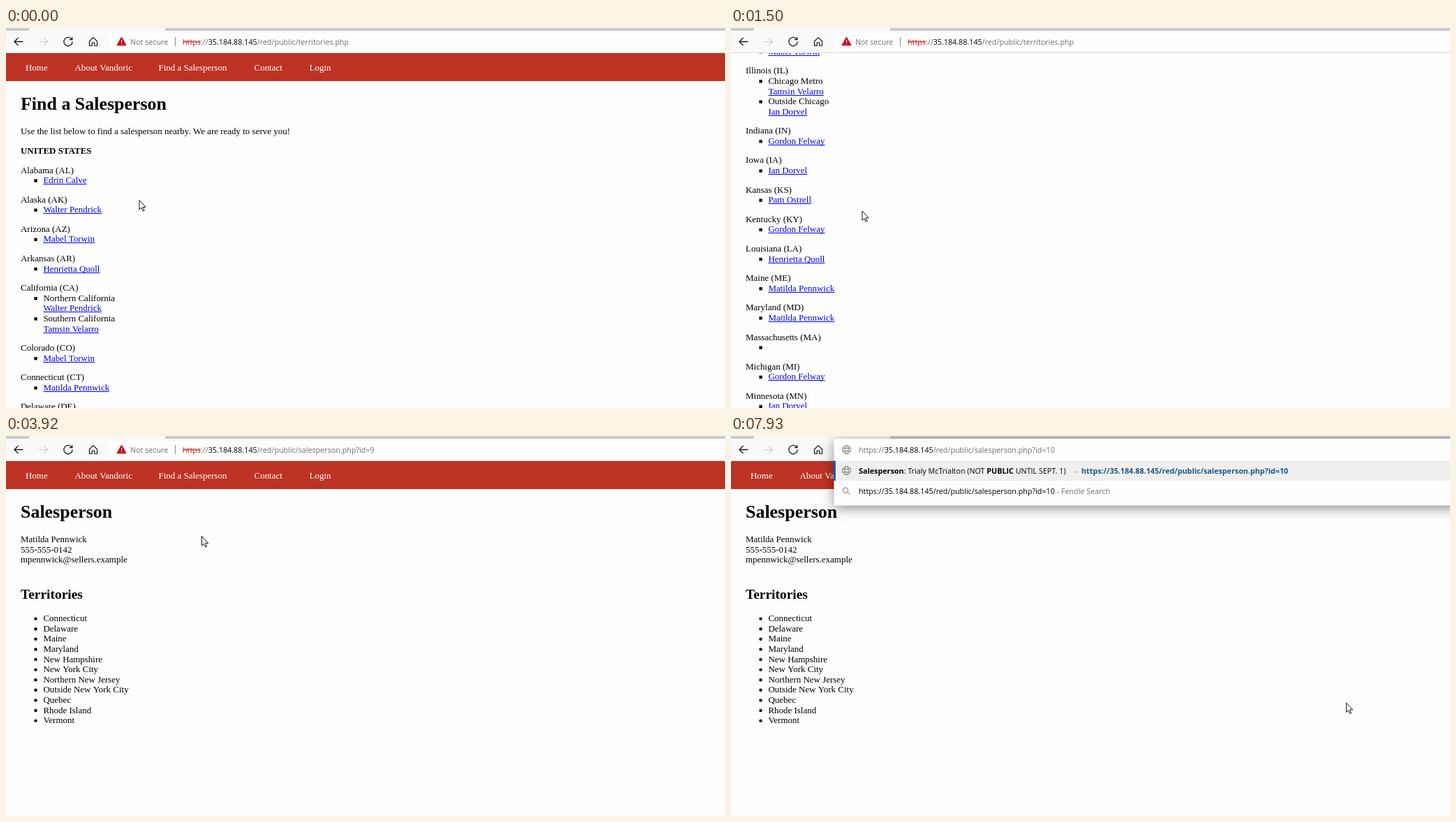
Write an HTML page with a canvas that moves like this. It is 1030 px wide and 544 px high and loops after 8000 ms.

```html
<!DOCTYPE html>
<html lang="en">
<head>
<meta charset="utf-8">
<title>Find a Salesperson</title>
<style>
  html, body { margin: 0; width: 100%; height: 100%; overflow: hidden; background: #fefefe; }
  canvas { display: block; }
</style>
</head>
<body>
<canvas id="stage" width="1030" height="544"></canvas>
<script>
const ctx = document.getElementById('stage').getContext('2d');
const W = 1030, H = 544, LOOP = 8000;
const ZOOM = 0.811, LINE = 18 * ZOOM, GAP = 16 * ZOOM;
const PAPER = '#fefefe', INK = '#000', GREY = '#6f6f6f', LINK = '#0000ee', RED = '#bc3324', URL_BLUE = '#16578c', SELECT = '#0078d7';

const serif = (px, bold) => `${bold ? 'bold ' : ''}${px}px "Liberation Serif", "Times New Roman", serif`;
const sans = bold => `${bold ? 'bold ' : ''}10.75px "Open Sans", "Noto Sans", sans-serif`;
const BODY = serif(16 * ZOOM), H1 = serif(32 * ZOOM, true), H2 = serif(24 * ZOOM, true);

const NAV = [['Home', 28], ['About Vandoric', 98.5], ['Find a Salesperson', 218.5], ['Contact', 355.5], ['Login', 434.5]];

const STATES = `Alabama (AL)|Edrin Calve
Alaska (AK)|Walter Pendrick
Arizona (AZ)|Mabel Torwin
Arkansas (AR)|Henrietta Quoll
California (CA)|Northern California:Walter Pendrick|Southern California:Tamsin Velarro
Colorado (CO)|Mabel Torwin
Connecticut (CT)|Matilda Pennwick
Delaware (DE)|Matilda Pennwick
Florida (FL)|Edrin Calve
Georgia (GA)|Edrin Calve
Hawaii (HI)|Mabel Torwin
Idaho (ID)|Mabel Torwin
Illinois (IL)|Chicago Metro:Tamsin Velarro|Outside Chicago:Ian Dorvel
Indiana (IN)|Gordon Felway
Iowa (IA)|Ian Dorvel
Kansas (KS)|Pam Ostrell
Kentucky (KY)|Gordon Felway
Louisiana (LA)|Henrietta Quoll
Maine (ME)|Matilda Pennwick
Maryland (MD)|Matilda Pennwick
Massachusetts (MA)|
Michigan (MI)|Gordon Felway
Minnesota (MN)|Ian Dorvel
Mississippi (MS)|Edrin Calve
Missouri (MO)|St. Louis Area:Edrin Calve|Kansas City Area:Ian Dorvel
Montana (MT)|Mabel Torwin
Nebraska (NE)|Ian Dorvel`.split('\n').map(row => row.split('|'));

const TERRITORIES = ['Connecticut', 'Delaware', 'Maine', 'Maryland', 'New Hampshire', 'New York City',
  'Northern New Jersey', 'Outside New York City', 'Quebec', 'Rhode Island', 'Vermont'];

// [time, scroll offset]
const SCROLL = [[0, 0], [150, 18], [270, 62], [390, 115], [510, 168], [660, 222.3], [810, 305], [930, 390], [1050, 475],
  [1200, 554.7], [1350, 630], [1500, 692], [1650, 748], [1800, 800], [1920, 848], [2040, 889.8]];

// [time, x, y, shape]; shape stays until it is changed
const POINTER = [[0, 190.5, 246, 'arrow'], [660, 187.5, 260], [1200, 187.5, 261.5], [1650, 174, 252], [1800, 148, 240], [1920, 128, 230],
  [2040, 114, 221], [2190, 116, 221, 'hand'], [2760, 115, 221, 'arrow'], [2880, 138, 213], [3030, 233, 191],
  [3180, 332, 262], [3303, 300, 312], [3427, 220, 300], [3550, 142, 256], [3673, 176, 206], [3797, 240, 166],
  [3920, 280, 143], [4070, 340, 104], [4190, 430, 58], [4310, 520, 28, 'beam'], [4440, 560, 25], [4840, 548, 23],
  [4960, 535, 21], [5110, 530, 17], [5230, 526, 26], [5380, 523, 24, 'arrow'], [5510, 523, 25],
  [7780, 634, 173.5], [7930, 881, 381.5]];
let shape;
for (const key of POINTER) shape = key[3] = key[3] || shape;

const CURSORS = {
  arrow: new Path2D('M.5 .5V14L3.5 11.2 5.6 16 7.6 15.1 5.5 10.4H9.6Z'),
  hand: new Path2D('M-1.5 1q1.5-2 3 0v6q2-1 3 .6q2.2-.8 2.8.8q2-.4 2 1.5v3.5q0 3-2 5h-7q-3-4-5.5-7.5q.5-2 3.7.8Z'),
  beam: new Path2D('M-3-7H-1L0-6 1-7H3M-3 7H-1L0 6 1 7H3M0-6V6')
};

const held = (keys, t) => keys.findLast(key => key[0] <= t);

function box(x, y, w, h, color) {
  ctx.fillStyle = color;
  ctx.fillRect(x, y, w, h);
}

function text(str, x, y, color = INK, font = BODY) {
  ctx.font = font;
  ctx.fillStyle = color;
  ctx.fillText(str, x, y);
  return x + ctx.measureText(str).width;
}

function stroke(path, x, y, color, width = 1.1) {
  ctx.save();
  ctx.translate(x, y);
  ctx.strokeStyle = color;
  ctx.lineWidth = width;
  ctx.stroke(new Path2D(path));
  ctx.restore();
}

// Runs of [text, colour, bold, fixed x] set one after another.
function runs(list, x, y) {
  for (const [str, color, bold, at] of list) x = text(str, at || x, y, color, sans(bold));
  return x;
}

function link(str, x, y) {
  const end = text(str, x, y, LINK);
  if (str) box(x, Math.round(y + 1), end - x, 1, LINK);
}

function navItems() {
  for (const [label, x] of NAV) text(label, x, 61, '#fff');
}

function pageTop(title) {
  box(0, 36, W, 40, RED);
  navItems();
  text(title, 21, 117, INK, H1);
}

function territoryPage(scroll) {
  ctx.translate(0, -scroll);
  pageTop('Find a Salesperson');
  text('Use the list below to find a salesperson nearby. We are ready to serve you!', 21, 152.3);
  text('UNITED STATES', 21, 179.9, INK, serif(16 * ZOOM, true));
  let y = 207.5;
  for (const [state, ...items] of STATES) {
    text(state, 21, y);
    for (const item of items) {
      y += LINE;
      box(40.4, y - 5.7, 4.3, 4.3, INK);
      const [area, person] = item.split(':');
      if (person) {
        text(area, 53.4, y);
        y += LINE;
      }
      link(person || area, 53.4, y);
    }
    y += LINE + GAP;
  }
}

function personPage() {
  pageTop('Salesperson');
  ['Matilda Pennwick', '555-555-0142', 'mpennwick@sellers.example'].forEach((str, i) => text(str, 21, 152.3 + i * LINE));
  text('Territories', 21, 232.8, INK, H2);
  TERRITORIES.forEach((name, i) => {
    const y = 265.2 + i * LINE;
    text(name, 53.4, y);
    ctx.beginPath();
    ctx.arc(42.5, y - 3.6, 2.2, 0, 7);
    ctx.fill();
  });
}

function globe(y) {
  stroke('M-6 0A6 6 0 1 1 6 0A6 6 0 1 1-6 0M-2.6 0A2.6 6 0 1 1 2.6 0A2.6 6 0 1 1-2.6 0M-5.5-2.2H5.5M-5.5 2.2H5.5', 165.5, y, '#707070', 0.9);
}

function toolbar() {
  box(0, 0, W, 36, '#f9f9f9');
  box(0, 0, 33, 4, '#cbcbcb');
  box(228, 0, W, 4, '#cbcbcb');
  box(0, 35, W, 1, '#d9d9d9');
  stroke('M6.5 0H-6M-.5-5.5-6 0-.5 5.5', 18, 19.5, '#1a1a1a', 1.3);
  stroke('M-6.5 0H6M.5-5.5 6 0 .5 5.5', 53.5, 19.5, '#cccccc', 1.2);
  stroke('M5.3-3.2A6.2 6.2 0 1 0 6.2 0M5.8-6.5V-2.8H2', 89, 19.5, '#1a1a1a', 1.3);
  stroke('M-5.5-.5 0-6 5.5-.5V6H1.8V1.5H-1.8V6H-5.5Z', 125, 19.5, '#1a1a1a', 1.2);
}

function pill(color, ring) {
  ctx.beginPath();
  ctx.roundRect(148, 7, W, 25, 4);
  ctx.fillStyle = color;
  ctx.fill();
  if (ring) {
    ctx.strokeStyle = '#2f7cd0';
    ctx.lineWidth = 1.5;
    ctx.stroke();
  }
}

const HOST = '35.184.88.145', PERSON = '/red/public/salesperson.php?id=';
const fullUrl = id => 'https://' + HOST + PERSON + id;

function restingAddress(path) {
  ctx.fillStyle = '#d0021b';
  ctx.fill(new Path2D('M165.3 13.2Q165.8 12.8 166.3 13.6L172.2 24.2Q172.4 25.2 171.4 25.2H159.4Q158.4 25.2 158.8 24.2L164.6 13.6Z'));
  box(164.9, 16.8, 1.2, 4, '#fff');
  box(164.9, 22, 1.2, 1.3, '#fff');
  text('Not secure', 178, 23.5, GREY, sans());
  box(242, 13, 1, 13, '#8a8a8a');
  const end = text('https', 253, 23.5, '#c5221f', sans());
  box(253, 19.5, end - 253, 1, '#c5221f');
  runs([['://', GREY], [HOST, INK], [path, GREY]], end, 23.5);
}

function editedAddress(id, selected) {
  globe(19.5);
  const x = runs([['https://', GREY], [HOST, INK], [PERSON + id, GREY]], 183, 23.5);
  if (selected) {
    ctx.font = sans();
    box(x, 11, ctx.measureText(selected).width, 17, SELECT);
    text(selected, x, 23.5, '#fff', sans());
  }
  return x;
}

const bold = str => [str, INK, true];
const plain = str => [str, INK];
const target = (x, match, rest = '') => [['-', GREY, false, x - 8.3], [fullUrl(match), URL_BLUE, true, x], [rest, URL_BLUE]];
const search = id => [plain(fullUrl(id)), [' - Fendle Search', GREY]];
const HEAD = [bold('Salesperson'), plain(': ')];

const SHORT_LIST = [
  [...HEAD, plain('Trialy McTrialton (NOT '), bold('PUBLIC'), plain(' UNTIL SEPT. 1)'), ...target(502, '10')],
  search('10')
];
const LONG_LIST = [
  [...HEAD, plain('Dozy Dozeman (FIRED FOR STEALING)'), ...target(448, '1', '1')],
  search('1'),
  [...HEAD, plain('Trialy McTrialton (NOT '), bold('PUBLIC'), plain(' UNTIL SEPT. '), bold('1'), plain(')'), ...target(502, '1', '0')],
  [plain('Find a '), bold('Salesperson'), ...target(292, '1', '2')]
];

function dropdown(rows, opening) {
  const bottom = rows.length * 29.25 + 41;
  ctx.save();
  if (opening) box(143, 36, W, bottom + 14 - 36, 'rgba(0,0,0,.1)');
  ctx.shadowColor = 'rgba(0,0,0,.45)';
  ctx.shadowBlur = opening ? 4 : 18;
  ctx.shadowOffsetY = opening ? 1 : 4;
  ctx.beginPath();
  ctx.roundRect(147.5, 4, W, bottom - 4, 3);
  ctx.fillStyle = PAPER;
  ctx.fill();
  ctx.restore();
  box(148, 35.5, W, 28.5, '#f0efee');
  box(147, 35.5, 3, 28.5, '#1a5dbe');
  if (opening) {
    ctx.save();
    ctx.beginPath();
    ctx.rect(150, 36, W, 40);
    ctx.clip();
    navItems();
    ctx.restore();
  }
  rows.forEach((row, i) => {
    const y = 49.5 + i * 29.25;
    if (i === 1) stroke('M2.3 0A3.8 3.8 0 1 1-5.3 0A3.8 3.8 0 1 1 2.3 0M1.3 2.7 5.5 6.5', 165.5, y - 1, '#777', 1);
    else globe(y);
    runs(row, 183, y + 4);
  });
}

function addressBar(t) {
  if (t >= 6930) {
    dropdown(SHORT_LIST);
    editedAddress('10');
    if (t < 7500) box(464, 11, 1, 16, INK);
  } else if (t >= 6440) {
    dropdown(LONG_LIST, t < 6560);
    editedAddress('1', '1');
  } else if (t >= 4690) {
    pill(PAPER, true);
    editedAddress('', '9');
  } else {
    pill(t >= 4310 ? '#f3f3f3' : PAPER);
    restingAddress(t < 2620 ? '/red/public/territories.php' : PERSON + '9');
  }
}

function pointer(t) {
  const [, x, y, kind] = held(POINTER, t);
  ctx.save();
  ctx.translate(x, y);
  ctx.lineWidth = 1;
  ctx.strokeStyle = '#111';
  ctx.fillStyle = '#fff';
  if (kind !== 'beam') ctx.fill(CURSORS[kind]);
  ctx.stroke(CURSORS[kind]);
  if (kind === 'hand') stroke('M1.5 7V10M4.5 7.6V10.5M7.3 8.4V10.8', 0, 0, '#111', 0.8);
  ctx.restore();
}

function draw(now) {
  const t = now % LOOP;
  box(0, 0, W, H, PAPER);
  ctx.save();
  ctx.beginPath();
  ctx.rect(0, 36, W, H - 36);
  ctx.clip();
  if (t < 2620) territoryPage(held(SCROLL, t)[1]);
  else personPage();
  ctx.restore();
  toolbar();
  addressBar(t);
  pointer(t);
}

function tick() {
  draw(performance.now());
  requestAnimationFrame(tick);
}
tick();
</script>
</body>
</html>
```
